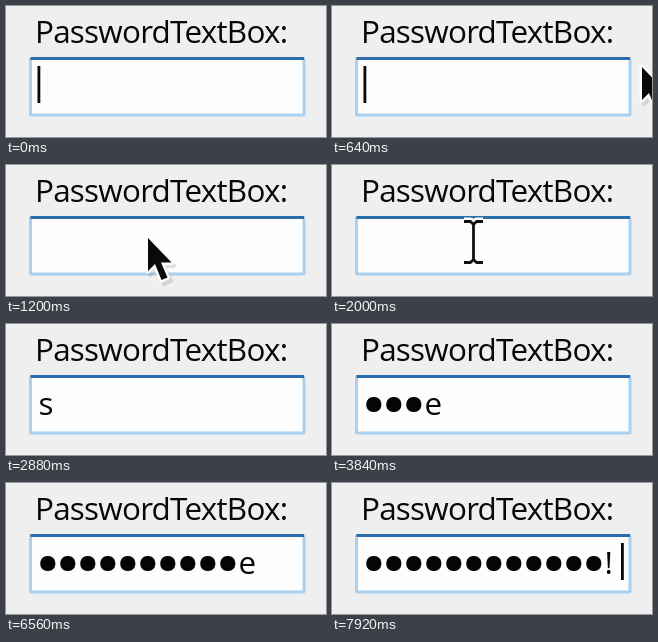
An HTML page that plays this animation: 320x131 px, repeating every 8 s.

```html
<!DOCTYPE html>
<html lang="en">
<head>
<meta charset="utf-8">
<title>Password text box</title>
<style>
  html, body { margin: 0; width: 100%; height: 100%; overflow: hidden; background: #efefef; }
  svg { display: block; width: 100vw; height: 100vh; }
  text { font: 31.4px "Open Sans", "Noto Sans", sans-serif; fill: #080808; }
  .label { letter-spacing: -.75px; }
</style>
</head>
<body>
<svg viewBox="0 0 320 131">
  <rect width="320" height="131" fill="#efefef"/>
  <text class="label" x="29" y="37.3">PasswordTextBox:</text>

  <rect x="23" y="51" width="276.5" height="59.5" rx="2" fill="#a9d0ee"/>
  <rect x="26" y="53" width="270.5" height="54.5" fill="#fdfdfd"/>
  <rect x="24.5" y="51" width="273.5" height="3" fill="#2b6cab"/>

  <g id="dots" fill="#050505"></g>
  <text id="letter" y="90.5"></text>
  <rect id="caret" y="60" width="2.8" height="37" fill="#080808"/>

  <g id="beam" fill="none" stroke-linejoin="round">
    <path id="beamShape" d="M132 56.5h6.5l3 3 3-3h6.5M141.5 59v36M132 97.5h6.5l3-3 3 3h6.5" stroke="#fdfdfd" stroke-width="8"/>
    <use href="#beamShape" style="stroke:#111"/>
    <path d="M132 56.5h6.5l3 3 3-3h6.5M141.5 59v36M132 97.5h6.5l3-3 3 3h6.5" stroke="#111" stroke-width="2.8"/>
  </g>

  <g id="arrow">
    <path d="M2 3v34l7-6 7 15 7-3-7-15h10z" fill="#777" opacity=".22" stroke="#777" stroke-width="4" stroke-linejoin="round"/>
    <path d="M0 0v33l7-7 6.5 16 6-2.5-6.5-15h10.5z" fill="#0a0a0a" stroke="#fdfdfd" stroke-width="5" stroke-linejoin="round" paint-order="stroke"/>
  </g>
</svg>
<script>
const LOOP = 8000, STEP = 80, LEFT = 33.5, PITCH = 20;
const phrase = "super secret!";
const keyTimes = [2720, 3040, 3360, 3840, 4160, 4880, 5120, 5520, 5760, 6240, 6480, 6800, 7440];
const caretIdle = [[0, 80], [400, 960], [1520, 1920], [2400, 2720]];
const caretDelay = 480;
const arrowPath = [[640, 310, 61], [880, 229.5, 65.5], [1040, 180, 70], [1200, 142, 73], [1280, 140, 74]];
const beamStart = 1520;

const $ = id => document.getElementById(id);
const show = (el, on) => el.setAttribute("visibility", on ? "visible" : "hidden");

const dots = Array.from(phrase, (_, i) => {
  const dot = document.createElementNS("http://www.w3.org/2000/svg", "rect");
  const attrs = { x: 34.3 + PITCH * i, y: 73, width: 15, height: 15, rx: 6.8 };
  for (const name in attrs) dot.setAttribute(name, attrs[name]);
  return $("dots").appendChild(dot);
});
$("beamShape").nextElementSibling.remove();

function along(path, t) {
  const i = path.findIndex(p => p[0] > t);
  if (i < 0) return path[path.length - 1].slice(1);
  const [a, b] = [path[i - 1], path[i]];
  const k = (t - a[0]) / (b[0] - a[0]);
  return [a[1] + (b[1] - a[1]) * k, a[2] + (b[2] - a[2]) * k];
}

function render(time) {
  const t = Math.floor((time % LOOP) / STEP) * STEP;
  const typed = keyTimes.filter(k => k <= t).length;

  dots.forEach((dot, i) => show(dot, i < typed - 1));
  $("letter").textContent = typed ? phrase[typed - 1] : "";
  $("letter").setAttribute("x", LEFT - 1 + PITCH * (typed - 1));

  const caretOn = typed
    ? t - keyTimes[typed - 1] >= caretDelay
    : caretIdle.some(([from, to]) => t >= from && t < to);
  const caretX = typed === phrase.length ? 289 : LEFT - 2 + PITCH * typed;
  $("caret").setAttribute("x", caretX);
  show($("caret"), caretOn);

  const pointing = t >= arrowPath[0][0] && t < beamStart;
  show($("arrow"), pointing);
  if (pointing) $("arrow").setAttribute("transform", `translate(${along(arrowPath, t)})`);
  show($("beam"), t >= beamStart && !typed);
}

const start = performance.now();
function tick() {
  render(performance.now() - start);
  requestAnimationFrame(tick);
}
render(0);
tick();
</script>
</body>
</html>
```
